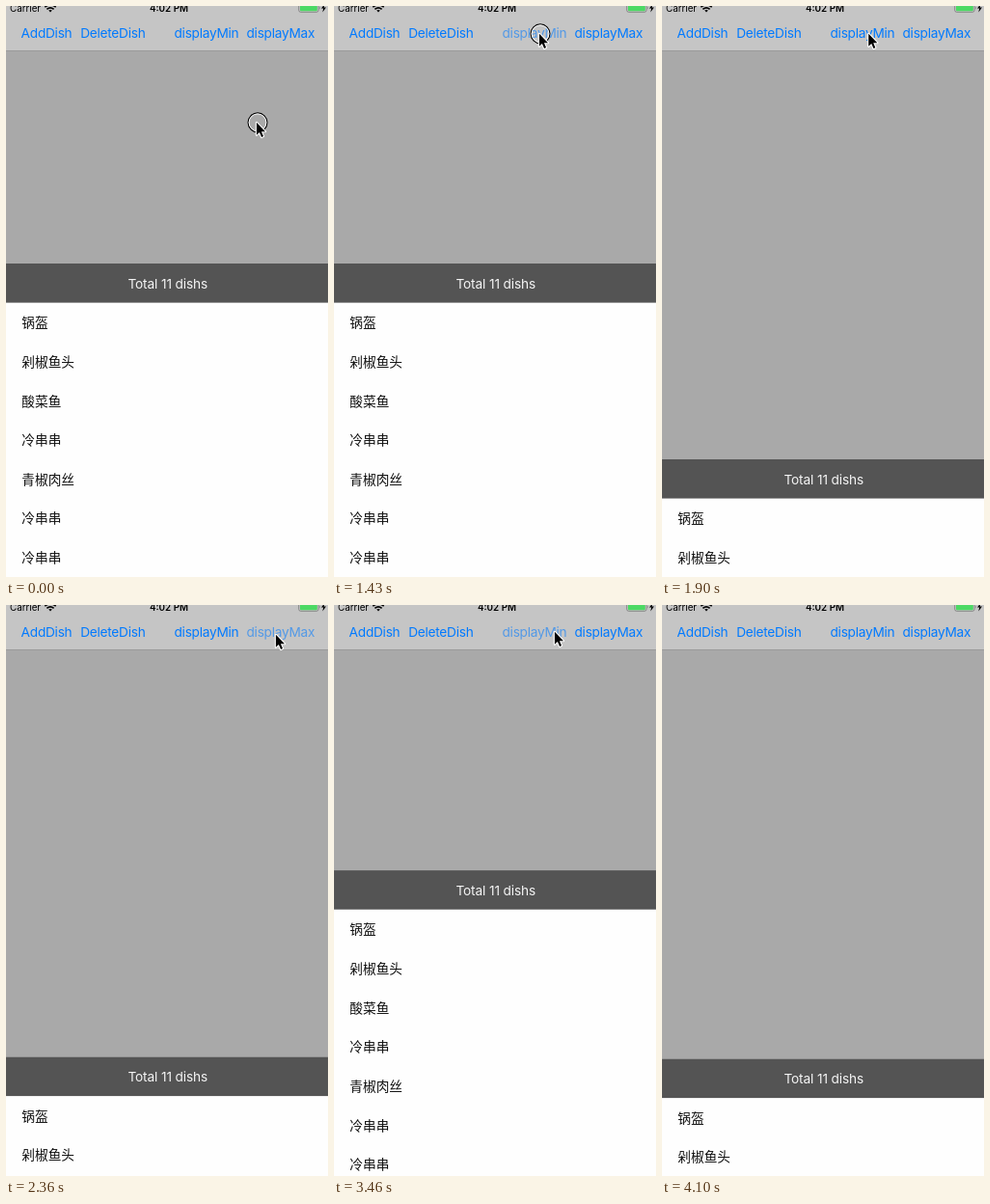
Animation, 334 px wide and 592 px high, one loop 4750 ms. Source, as an HTML page:

```html
<!DOCTYPE html>
<html lang="zh-CN">
<head>
<meta charset="utf-8">
<style>
  html, body { margin: 0; width: 100%; height: 100%; overflow: hidden; background: #a9a9a9; }
  svg { display: block; width: 334px; height: 592px; }
  text { font: 13.7px Inter, "Noto Sans CJK SC", "Noto Sans CJK", sans-serif; }
  .ui { letter-spacing: -.27px; }
  .title { letter-spacing: -.13px; fill: #f4f4f4; }
  .link { fill: #007aff; }
  .status { font-size: 9.8px; }
  .clock { font-weight: 600; }
</style>
</head>
<body>
<svg viewBox="0 0 334 592">
  <rect width="334" height="592" fill="#a9a9a9"/>
  <rect width="334" height="46" fill="#c5c5c5"/>
  <rect y="46" width="334" height="1" fill="#9a9a9a"/>

  <text class="status" x="4" y="6">Carrier</text>
  <g fill="none" stroke="#000" stroke-width="1.6">
    <path d="M40.3 1.2Q46 -3.6 51.7 1.2M42.4 3.4Q46 .4 49.6 3.4"/>
    <path d="M44.2 4.6Q46 3.4 47.8 4.6L46 6.6Z" fill="#000" stroke="none"/>
  </g>
  <text class="status clock" x="169" y="6" text-anchor="middle">4:02 PM</text>
  <rect x="303.7" y="-2.5" width="20.4" height="8.8" rx="2" fill="none" stroke="#777" stroke-width=".8"/>
  <rect x="305" y="-2" width="17.8" height="7.2" rx="1" fill="#4cd964"/>
  <path d="M325 .4q1.4 1.4 0 3z" fill="#777"/>
  <path d="M330.4 -2L327 2.6H329.2L328.3 6.4L332 1.5H329.7Z"/>

  <g class="ui link">
    <text x="15.6" y="33">AddDish</text>
    <text x="77.2" y="33">DeleteDish</text>
    <text x="174.5" y="33" id="min">displayMin</text>
    <text x="249.5" y="33" id="max">displayMax</text>
  </g>

  <g id="panel">
    <rect width="334" height="600" fill="#fefefe"/>
    <rect width="334" height="40.6" fill="#545454"/>
    <text class="title" x="167.8" y="25.6" text-anchor="middle">Total 11 dishs</text>
  </g>

  <g id="cursor">
    <g id="ring" fill="none">
      <circle cx="2" cy=".8" r="9.9" stroke="#000" stroke-width="1.2"/>
      <circle cx="2" cy=".8" r="8.9" stroke="#fff" stroke-width="1"/>
    </g>
    <path d="M.9 .8V13.8L3.9 11L6.1 16L8 15.1L5.9 10.2H10Z" stroke="#fff" stroke-width="2.2" stroke-linejoin="round" paint-order="stroke"/>
  </g>
</svg>
<script>
const LOOP = 4750, ROW = 40.65, TOP = 267, LOW = 470.5, REST = 468.5;
const $ = id => document.getElementById(id);
const dishes = ['锅盔', '剁椒鱼头', '酸菜鱼', '冷串串', '青椒肉丝', '冷串串', '冷串串'];
dishes.forEach((name, i) => {
  const row = document.createElementNS('http://www.w3.org/2000/svg', 'text');
  row.textContent = name;
  row.setAttribute('x', 16.3);
  row.setAttribute('y', 66.2 + i * ROW);
  row.setAttribute('fill', '#111');
  $('panel').append(row);
});

const clamp = v => Math.max(0, Math.min(1, v));
const smooth = v => v * v * (3 - 2 * v);
const mix = (a, b, p) => a + (b - a) * p;
const linear = v => v;

// Tap release times; each starts a panel slide
const taps = [1447, 2360, 3431];

// time, x, y, easing into this point
const path = [
  [30, 259, 120], [220, 252, 110], [400, 252, 110], [840, 217, 45],
  [950, 217, 45], [1270, 212, 28], [1870, 212, 28], [2240, 279, 30],
  [2420, 279, 30], [2600, 277, 30], [2750, 277, 30], [3220, 228, 27],
  [3480, 228, 27], [3830, 313, 325, v => v ** 1.4], [4090, 327, 600, linear]
];

function pointer(t) {
  const i = path.findIndex(k => k[0] > t);
  if (i < 0) return path.at(-1).slice(1, 3);
  if (!i) return path[0].slice(1, 3);
  const [t0, x0, y0] = path[i - 1], [t1, x1, y1, ease = smooth] = path[i];
  const p = ease((t - t0) / (t1 - t0));
  return [mix(x0, x1, p), mix(y0, y1, p)];
}

function panelY(t) {
  const slide = start => smooth(clamp((t - start) / 250));
  if (t < taps[1]) {
    const settle = smooth(clamp((t - 1860) / 120));
    return mix(TOP, mix(LOW, REST, settle), slide(taps[0]));
  }
  return t < taps[2] ? mix(REST, TOP, slide(taps[1])) : mix(TOP, LOW, slide(taps[2]));
}

const dim = (t, tap) => t < tap - 80 ? 1 : mix(.58, 1, clamp((t - tap) / 300) ** 2);

function draw(now) {
  const t = now % LOOP;
  $('panel').setAttribute('transform', `translate(0 ${panelY(t)})`);
  $('cursor').setAttribute('transform', `translate(${pointer(t)})`);
  const ring = t < 110 || taps.some(tap => t >= tap - 88 && t < tap - 8);
  $('ring').setAttribute('opacity', ring ? 1 : 0);
  $('min').setAttribute('opacity', Math.min(dim(t, taps[0]), dim(t, taps[2])));
  $('max').setAttribute('opacity', dim(t, taps[1]));
  requestAnimationFrame(draw);
}
requestAnimationFrame(draw);
</script>
</body>
</html>
```
